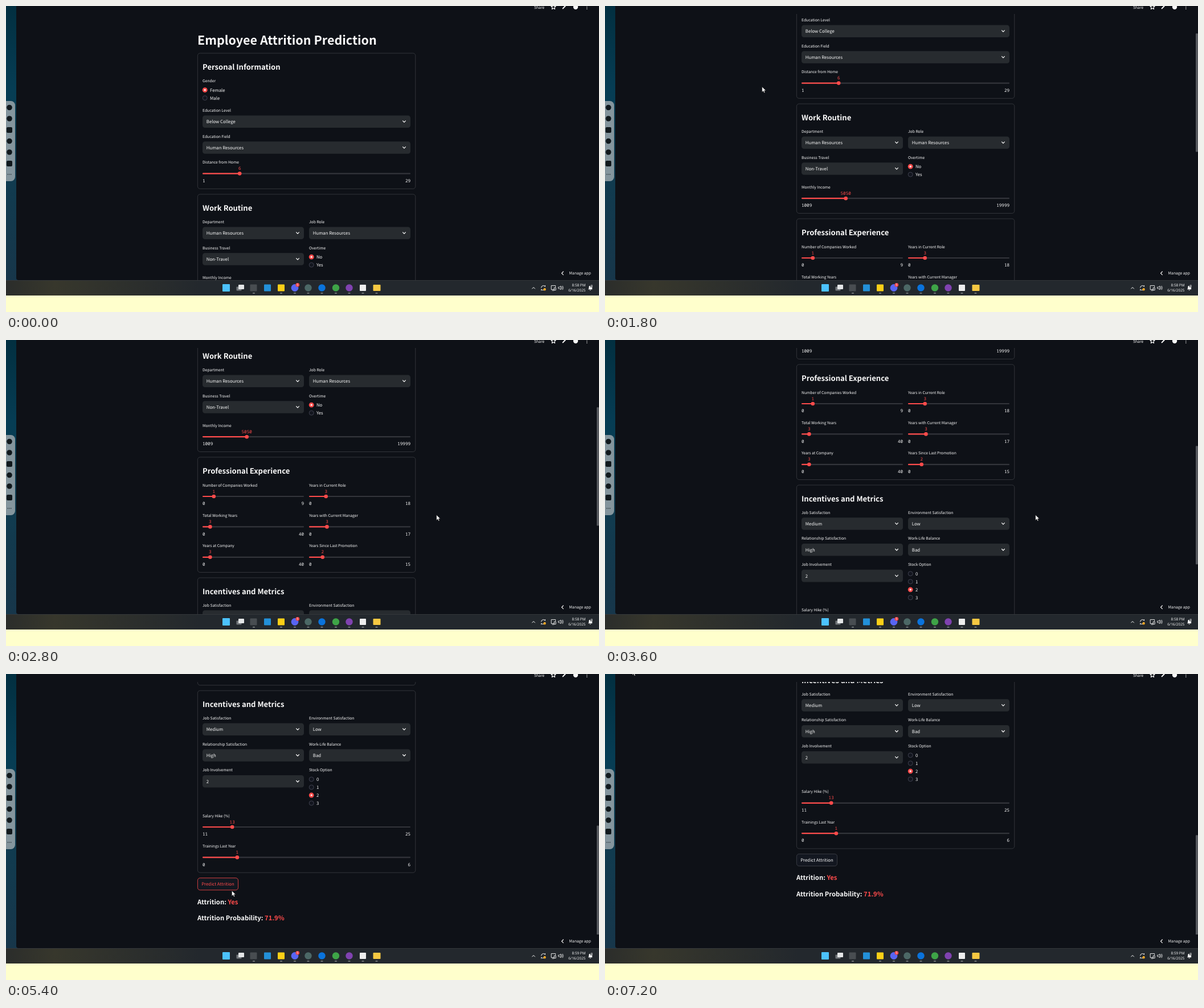
An HTML page for the animation above (7300 ms loop, 1041x538 px).

```html
<!DOCTYPE html>
<html lang="en">
<head>
<meta charset="utf-8">
<title>Employee Attrition Prediction</title>
<style>
  html, body { margin: 0; width: 100%; height: 100%; overflow: hidden; background: #ffffcc; }
  svg { display: block; width: 100%; height: 100%; }
  text {
    font-family: "Noto Sans CJK JP", "Noto Sans CJK SC", "Noto Sans CJK", sans-serif;
    fill: #fafafa; text-rendering: geometricPrecision;
  }
  .title { font-size: 21.5px; font-weight: 700; }
  .head { font-size: 13.05px; font-weight: 700; }
  .label { font-size: 6.75px; }
  .body { font-size: 7.78px; }
  .result { font-size: 11.3px; font-weight: 700; }
  .num { font-family: "Noto Sans Mono", monospace; font-size: 7.6px; }
  .clock { font-family: "Open Sans", sans-serif; font-size: 6.4px; }
  .red { fill: #ff4b4b; }
  .mid { text-anchor: middle; }
  .end { text-anchor: end; }
  .line { fill: none; stroke: #fafafa; stroke-width: 1.2; stroke-linecap: round; stroke-linejoin: round; }
</style>
</head>
<body>
<svg id="stage" viewBox="0 0 1041 538" preserveAspectRatio="none"></svg>
<script>
const LOOP = 7300, STEP = 100, RED = '#ff4b4b', PAGE = '#0e1117';
const LEFT = 345, MID = 532, FULL = 365, HALF = 178;

const rect = (x, y, w, h, fill, r = 0, more = '') =>
  `<rect x="${x}" y="${y}" width="${w}" height="${h}" rx="${r}" fill="${fill}" ${more}/>`;
const circle = (x, y, r, fill, more = '') =>
  `<circle cx="${x}" cy="${y}" r="${r}" fill="${fill}" ${more}/>`;
const text = (x, y, cls, s) => `<text x="${x}" y="${y}" class="${cls}">${s}</text>`;
const line = (d, more = '') => `<path class="line" d="${d}" ${more}/>`;
const label = (x, y, s) => text(x, y + 2.6, 'label', s);

function card(y, bottom, name) {
  return rect(336.4, y, 382.4, bottom - y, 'none', 4.3, 'stroke="#3b3e43" stroke-width="0.8"')
    + text(LEFT, y + 29, 'head', name);
}

function select(x, y, w, name, value) {
  const cx = x + w - 11;
  return label(x, y, name)
    + rect(x, y + 9.2, w, 21.6, '#272b2f', 4.3)
    + text(x + 6.8, y + 23.2, 'body', value)
    + line(`M${cx - 2.4} ${y + 18.7}l2.4 2.5 2.4-2.5`);
}

function radios(x, y, name, options, chosen) {
  return label(x, y, name) + options.map((s, i) => {
    const cy = y + 16.2 + i * 14, on = i === chosen;
    return (on ? circle(x + 4.2, cy, 4.4, RED) + circle(x + 4.2, cy, 1.6, '#fff')
      : circle(x + 4.2, cy, 4, '#12151e', 'stroke="#4c4d5c" stroke-width="0.8"'))
      + text(x + 13, cy + 3, 'body', s);
  }).join('');
}

function slider(x, y, w, name, min, max, value) {
  const kx = x + w * (value - min) / (max - min), ty = y + 18.9;
  return label(x, y, name)
    + text(kx, y + 13.6, 'num red mid', value)
    + rect(x, ty, w, 2.2, '#33353b', 1)
    + rect(x, ty, kx - x, 2.2, RED, 1)
    + circle(kx, y + 20, 3.3, RED)
    + text(x, y + 35.2, 'num', min)
    + text(x + w, y + 35.2, 'num end', max);
}

const form = [
  text(336, 67.7, 'title', 'Employee Attrition Prediction'),
  card(83, 321.4, 'Personal Information'),
  radios(LEFT, 131.5, 'Gender', ['Female', 'Male'], 0),
  select(LEFT, 183.2, FULL, 'Education Level', 'Below College'),
  select(LEFT, 229, FULL, 'Education Field', 'Human Resources'),
  slider(LEFT, 274.6, FULL, 'Distance from Home', 1, 29, 6),

  card(331, 523.5, 'Work Routine'),
  select(LEFT, 379.2, HALF, 'Department', 'Human Resources'),
  select(MID, 379.2, HALF, 'Job Role', 'Human Resources'),
  select(LEFT, 425, HALF, 'Business Travel', 'Non-Travel'),
  radios(MID, 425, 'Overtime', ['No', 'Yes'], 0),
  slider(LEFT, 477.2, FULL, 'Monthly Income', 1009, 19999, 5050),

  card(533, 735.5, 'Professional Experience'),
  slider(LEFT, 582, HALF, 'Number of Companies Worked', 0, 9, 1),
  slider(MID, 582, HALF, 'Years in Current Role', 0, 18, 3),
  slider(LEFT, 635.4, HALF, 'Total Working Years', 0, 40, 3),
  slider(MID, 635.4, HALF, 'Years with Current Manager', 0, 17, 3),
  slider(LEFT, 688.8, HALF, 'Years at Company', 0, 40, 3),
  slider(MID, 688.8, HALF, 'Years Since Last Promotion', 0, 15, 2),

  card(745, 1065, 'Incentives and Metrics'),
  select(LEFT, 793, HALF, 'Job Satisfaction', 'Medium'),
  select(MID, 793, HALF, 'Environment Satisfaction', 'Low'),
  select(LEFT, 838.8, HALF, 'Relationship Satisfaction', 'High'),
  select(MID, 838.8, HALF, 'Work-Life Balance', 'Bad'),
  select(LEFT, 884.6, HALF, 'Job Involvement', '2'),
  radios(MID, 884.6, 'Stock Option', [0, 1, 2, 3], 2),
  slider(LEFT, 964.8, FULL, 'Salary Hike (%)', 11, 25, 13),
  slider(LEFT, 1018.2, FULL, 'Trainings Last Year', 0, 6, 1),

  rect(336.4, 1074.4, 71.2, 21.2, '#131720', 4.3, 'id="button" stroke-width="0.8"'),
  text(372, 1088, 'body mid" id="caption', 'Predict Attrition'),
  '<g id="results">',
  text(336, 1120.4, 'result', 'Attrition: <tspan class="red">Yes</tspan>'),
  text(336, 1149, 'result', 'Attrition Probability: <tspan class="red">71.9%</tspan>'),
  '</g>'
].join('');

const header = text(927, 4.6, 'label', 'Share')
  + line('M961-2.4l1.2 2.7 2.9.3-2.2 2 .7 2.9-2.6-1.5-2.6 1.5.7-2.9-2.2-2 2.9-.3z', 'stroke-width="0.9"')
  + line('M977.6 4.4l4.2-4.4', 'style="stroke-width:2"')
  + circle(1000, 1.8, 4.2, '#fafafa')
  + [-1, 2, 5].map(y => circle(1019.8, y, 0.8, '#fafafa')).join('');

const dark = '#10181c';
const dock = rect(-8, 167, 24, 141, '#84959d', 7.5)
  + [178.5, 198, 237.5, 257].map(y => circle(6, y, 4.8, dark)).join('')
  + [218, 277].map(y => rect(1, y - 5, 10, 10, dark, 2)).join('')
  + [3.2, 6, 8.8].map(x => circle(x, 296, 0.7, dark)).join('');

const tile = (x, s, fill) => rect(x - s / 2, 495.5 - s / 2, s, s, fill, 1);
const taskbar = rect(0, 482, 1041, 27, '#23282d')
  + rect(0, 482, 340, 27, 'url(#olive)')
  + rect(0, 482, 1041, 0.8, '#373b3f')
  + rect(520.5, 485, 20, 21, '#363b40', 2, 'id="active"')
  + tile(386.5, 13, '#4cc2ff')
  + rect(404.5, 493.5, 9, 7, '#72777b', 1) + rect(408, 490, 10, 8, '#e4e6e7', 1)
  + tile(434.5, 12, '#484d51')
  + tile(459, 12, '#2390d8')
  + tile(483, 12, '#fbcf17')
  + circle(507, 495.5, 6.4, '#5865f2')
  + circle(511.8, 490.3, 3.4, '#ee4246') + text(511.8, 492.3, 'mid" font-size="5.4', '5')
  + [[530.5, '#4c6866'], [554.5, '#0a73dc'], [579, '#3ea447'], [602.5, '#8042b0']]
      .map(([x, c]) => circle(x, 495.5, 6.2, c)).join('')
  + tile(626.5, 11, '#eeeeee')
  + rect(644.5, 490, 13, 11, '#f6c842', 1)
  + [435, 483, 507, 530.5, 554.5, 579, 602.5, 626.5, 650.5]
      .map(x => rect(x - 2, 504.3, 4, 1.2, '#999da0', 0.6)).join('')
  + line('M923.7 497l2.4-2.4 2.4 2.4', 'style="stroke-width:1"')
  + line('M939.6 495a3.7 3.7 0 0 1 6.8-1.6v-2M946.5 496.4a3.7 3.7 0 0 1-6.7 1.6v2', 'style="stroke-width:1"')
  + circle(945.6, 498.3, 2.2, '#f5a623')
  + line('M962 498.6h-4.8v-7h7.4v2.6M959 500.2h3M962.6 495.5h2.6v4h-2.6z', 'style="stroke-width:.9"')
  + line('M970 494.2h1.8l2.2-2v6.6l-2.2-2H970zM975.7 493.6q1.4 1.9 0 3.8M977.2 492.2q2.5 3.3 0 6.6', 'style="stroke-width:.8"')
  + text(1017.5, 493.4, 'clock end" id="clock', '')
  + text(1017.5, 502.2, 'clock end', '6/16/2025')
  + '<path fill="#fafafa" d="M1022 498.2l1.2-1.7v-2q0-2.8 2.6-2.8v2.8h3.3v3.7zM1024.4 499h2.6q-1.3 1.8-2.6 0z"/>'
  + line('M1027 491h2.5l-2.5 2.5h2.5', 'style="stroke-width:.8"');

document.getElementById('stage').innerHTML = `
  <defs>
    <linearGradient id="wall" x1="0" y1="0" x2="0" y2="1">
      <stop offset="0" stop-color="#022f40"/><stop offset=".3" stop-color="#063d54"/>
      <stop offset=".65" stop-color="#113b4f"/><stop offset="1" stop-color="#17364a"/>
    </linearGradient>
    <linearGradient id="olive">
      <stop offset="0" stop-color="#2b2d2b"/><stop offset=".25" stop-color="#37372c"/>
      <stop offset="1" stop-color="#23282d"/>
    </linearGradient>
    <clipPath id="view">${rect(18, 14, 1023, 468, '#fff')}</clipPath>
    <clipPath id="rail">${rect(1030, 0, 11, 458, '#fff')}</clipPath>
  </defs>
  ${rect(0, 508.5, 1041, 29.5, '#ffffcc', 0, 'id="strip"')}
  ${rect(0, 0, 30, 483, 'url(#wall)')}
  ${taskbar}
  ${rect(18, -10, 1033, 492, PAGE, 4)}
  <g clip-path="url(#view)"><g id="form">${form}</g></g>
  <g clip-path="url(#rail)">${rect(1037, 0, 4, 208, '#55585d', 1, 'id="thumb"')}</g>
  ${header}${dock}
  ${line('M978.3 467l-2.8 2.8 2.8 2.8')}
  ${text(988.6, 472.2, 'label', 'Manage app')}
  <path id="cursor" d="M0 0v9.4l2.2-2 1.5 3.3 1.6-.7-1.5-3.2h3z" fill="#fff" stroke="#111" stroke-width=".6"/>`;

const ui = {};
document.querySelectorAll('[id]').forEach(e => ui[e.id] = e);
const set = (e, attrs) => { for (const k in attrs) e.setAttribute(k, attrs[k]); };
const show = (e, on) => set(e, { visibility: on ? 'visible' : 'hidden' });
const within = (t, a, b) => t >= a && t < b;

// Eased values between [time, ...values] keys.
function track(keys, t) {
  const i = keys.findIndex(k => k[0] > t);
  if (i < 0) return keys[keys.length - 1].slice(1);
  if (!i) return keys[0].slice(1);
  const a = keys[i - 1], b = keys[i];
  const p = (t - a[0]) / (b[0] - a[0]), e = p * p * (3 - 2 * p);
  return a.slice(1).map((v, n) => v + (b[n + 1] - v) * e);
}

const scrollKeys = [[600, 0], [1300, 100], [1400, 100], [1800, 159], [2000, 163], [2100, 163],
  [2600, 327], [2800, 327], [3500, 490], [3600, 490], [4300, 701], [5300, 701], [5600, 758]];
const cursorKeys = [[0, 48, -14], [700, 275.7, 142], [1900, 275.7, 142], [2600, 755.7, 307.5],
  [4000, 755.7, 307.5], [4300, 752.7, 306], [4700, 376, 384], [5200, 376, 384],
  [5800, 454.7, 372.5], [5900, 454.7, 372.5], [6400, 200, 70], [6500, 200, 70], [7200, 48, -7.5]];

function draw(time) {
  const t = Math.floor(time % LOOP / STEP) * STEP;
  const [scroll] = track(scrollKeys, t), [cx, cy] = track(cursorKeys, t);
  const done = t >= 5300, hot = within(t, 4800, 6300), pressed = within(t, 5000, 5200);
  const ratio = 500 / (done ? 1258 : 1200);

  set(ui.form, { transform: `translate(0 ${-scroll})` });
  set(ui.cursor, { transform: `translate(${cx} ${cy})` });
  set(ui.thumb, { y: -18 + scroll * ratio, height: 500 * ratio });
  show(ui.thumb, scroll > 0);
  show(ui.results, done);
  set(ui.button, { fill: pressed ? RED : '#131720', stroke: hot ? RED : '#43464d' });
  ui.caption.style.fill = hot && !pressed ? RED : '#fafafa';
  ui.clock.textContent = done ? '8:59 PM' : '8:58 PM';
  show(ui.active, within(t, 5800, 6300));
  const pale = within(t, 1000, 1300) || within(t, 5800, 6200) || within(t, 6800, 7100);
  set(ui.strip, { fill: pale ? '#f7f7f7' : '#ffffcc' });
}

const start = performance.now();
function tick() {
  draw(performance.now() - start);
  requestAnimationFrame(tick);
}
tick();
</script>
</body>
</html>
```
